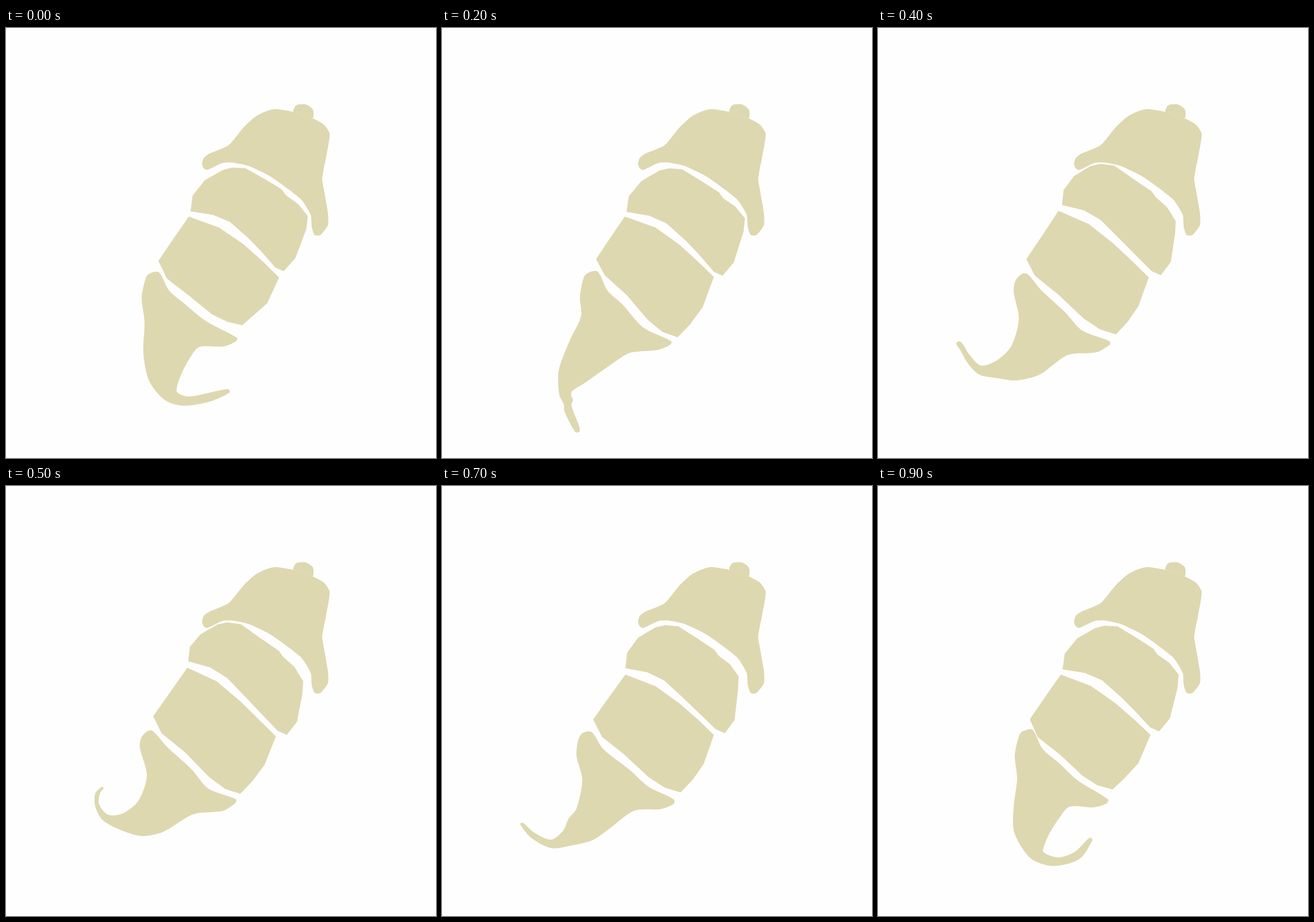
Animation of 748 by 748 pixels, one loop 1 s. Source, as an HTML page:

```html
<!DOCTYPE html>
<html lang="en">
<head>
<meta charset="utf-8">
<style>
  html, body { margin: 0; width: 100%; height: 100%; overflow: hidden; background: #fefefe; }
  svg { display: block; width: 100vw; height: 100vh; }
</style>
</head>
<body>
<svg viewBox="0 0 748 748" fill="#ddd8b0">
  <path id="cap"/>
  <path id="head"/>
  <path d="M500,146L533,157" stroke="#e2ddba"/>
  <path id="upper"/>
  <path id="lower"/>
  <path id="tail"/>
</svg>
<script>
const points = text => text.split(" ").map(p => p.split(",").map(Number));
const show = (id, d) => document.getElementById(id).setAttribute("d", d);
const polygon = pts => "M" + pts.join("L") + "Z";

// Closed curve through the points; handles scale with each side's length
function curve(pts, k = 0.28) {
  const n = pts.length, at = i => pts[(i + n) % n];
  const tangent = i => {
    const [a, b] = at(i - 1), [c, d] = at(i + 1), len = Math.hypot(c - a, d - b);
    return [(c - a) / len, (d - b) / len];
  };
  return "M" + pts[0] + pts.map((p, i) => {
    const q = at(i + 1), s = tangent(i), e = tangent(i + 1);
    const r = k * Math.hypot(q[0] - p[0], q[1] - p[1]);
    return "C" + [p[0] + s[0] * r, p[1] + s[1] * r, q[0] - e[0] * r, q[1] - e[1] * r, ...q];
  }).join("") + "Z";
}

// Moves the chosen corners to new places; nearby points follow by distance
function warp(base, corners, places) {
  return base.map(([x, y]) => {
    let sum = 0, dx = 0, dy = 0;
    corners.forEach((c, i) => {
      const [cx, cy] = base[c], [px, py] = places[i];
      const w = 1 / ((x - cx) ** 2 + (y - cy) ** 2 + 1e-6);
      sum += w;
      dx += w * (px - cx);
      dy += w * (py - cy);
    });
    return [x + dx / sum, y + dy / sum];
  });
}

const pose = (upper, lower, tail) => ({ upper: points(upper), lower: points(lower), tail: points(tail) });
const midway = (a, b) => a.map((p, i) => p.map((v, j) => (v + b[i][j]) / 2));
const blend = (a, b) => ({
  upper: midway(a.upper, b.upper), lower: midway(a.lower, b.lower), tail: midway(a.tail, b.tail)
});

show("cap", curve(points("500,146 503,136 508,133 522,133 534,142 533,157"), 0.2));
show("head", curve(points("468,141 500,146 533,157 553,168 563,184 557,224 550,262 553,281 560,322 560,343 547,360 537,360 532,347 530,325 513,298 461,259 422,240 393,234 376,235 350,247 344,244 341,236 344,226 353,219 387,204 414,172 434,154 452,145"), 0.2));

const upper = points("319,317 322,290 341,264 371,246 388,242 411,244 444,265 474,285 481,295 501,310 516,331 515,354 509,407 492,430 476,423 447,395 420,369 386,338 357,324");
const lower = points("319,328 371,348 413,378 446,407 473,433 455,484 436,511 415,533 388,525 360,507 318,468 278,436 263,406 290,368");

const low = pose(
  "321,319 377,247 487,291 525,327 483,423",
  "318,328 475,434 411,517 280,436 265,405",
  "266,425 284,457 311,480 348,510 402,539 400,545 378,554 336,555 320,574 306,600 298,622 298,634 319,641 386,628 389,634 354,650 308,657 276,647 249,614 239,566 241,511 236,469 244,433 252,426"
);
const hook = pose(
  "321,319 378,247 486,293 523,328 489,427",
  "318,328 474,433 408,528 278,437 264,406",
  "269,424 286,457 316,483 347,512 400,545 398,552 375,559 333,558 315,578 299,603 289,626 288,637 314,646 343,636 368,612 373,616 350,649 305,661 266,648 237,603 236,559 242,509 238,468 247,431 256,425"
);
const drop = pose(
  "321,320 378,248 489,296 527,331 488,431",
  "318,328 473,433 410,538 283,430 268,402",
  "271,424 288,457 314,481 350,521 399,545 397,551 375,560 327,565 296,584 249,617 226,632 225,641 228,647 225,656 239,694 239,702 232,703 213,667 212,655 204,638 203,596 222,544 242,501 240,468 247,433 256,425"
);
const reach = pose(
  "319,317 371,246 481,295 516,331 492,430",
  "319,328 473,433 415,533 278,436 263,406",
  "260,428 280,457 328,495 359,523 403,545 403,553 380,562 334,565 294,594 262,616 222,626 190,630 155,612 136,588 141,586 159,602 190,615 211,599 220,579 234,561 244,511 234,470 236,446 243,431"
);
const lift = pose(
  "320,308 370,240 483,294 518,336 492,430",
  "314,318 471,434 414,533 273,431 258,402",
  "260,428 284,456 326,495 355,526 403,545 403,551 380,564 330,569 281,603 241,613 207,609 176,603 156,583 143,560 136,549 142,545 149,552 158,567 179,587 207,578 232,553 245,506 236,459 239,440 250,428"
);
const curl = pose(
  "314,302 365,242 480,299 516,343 485,436",
  "317,314 468,437 401,538 268,429 254,399",
  "250,424 278,453 320,491 348,526 397,545 396,551 375,566 322,573 266,600 232,605 190,587 161,560 155,534 167,511 195,499 198,505 178,517 166,540 177,557 199,561 228,543 245,502 230,452 231,437 242,425"
);

const poses = [low, hook, drop, reach, lift, blend(lift, curl), curl, reach, drop, hook];
const start = performance.now();

function draw(now) {
  const p = poses[Math.floor(Math.max(0, now - start) / 100) % poses.length];
  show("upper", polygon(warp(upper, [0, 3, 8, 10, 13], p.upper)));
  show("lower", polygon(warp(lower, [0, 4, 7, 11, 12], p.lower)));
  show("tail", curve(p.tail));
  requestAnimationFrame(draw);
}
draw(start);
</script>
</body>
</html>
```
